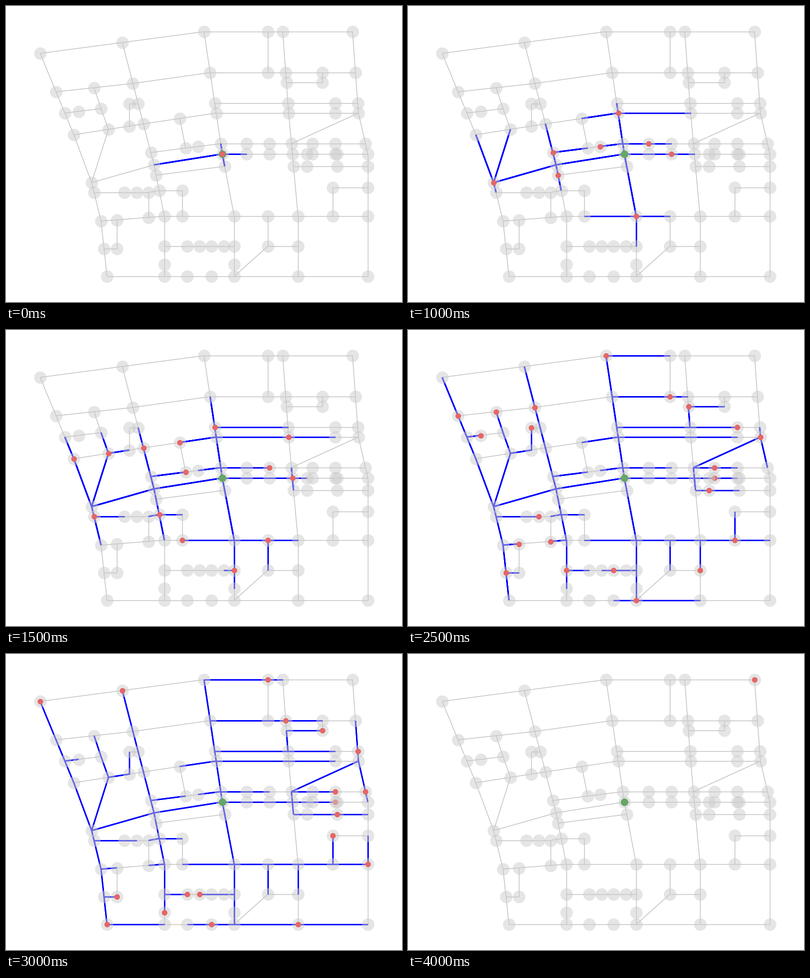
Write a matplotlib script that moves like this. It is 800x600 px and loops after 4500 ms.

```python
"""Breadth-first search spreading over a small street network."""
import matplotlib.pyplot as plt
import numpy as np
from matplotlib.animation import FuncAnimation
from matplotlib.collections import LineCollection

W, H, DPI = 800, 600, 100
STEPS, STEP_MS = 9, 500

near = {}      # junction -> neighbours, in the order the search tries them
streets = []


def link(*pts):
    """Join the junctions one after the other."""
    for a, b in zip(pts, pts[1:]):
        near.setdefault(a, []).append(b)
        near.setdefault(b, []).append(a)
        streets.append((a, b))


def avenue(knees, *stops):
    """Junctions of a street running down through its knees, keyed by y."""
    xs, ys = zip(*knees)
    return {y: (round(float(np.interp(y, ys, xs)), 1), y)
            for y in sorted({*ys, *stops})}


def row(y, avenues, *xs):
    """Level street between avenues, with extra junctions at xs."""
    link(*sorted([a[y] for a in avenues] + [(x, y) for x in xs]))


def slant(a, b, *xs):
    """Straight street from a to b; gives its inner junctions."""
    inner = [(x, round(float(np.interp(x, (a[0], b[0]), (a[1], b[1]))), 1)) for x in xs]
    link(a, *inner, b)
    return inner


rows = (135, 197, 217, 279, 300, 325, 426)
west = avenue([(69, 96), (137, 261), (173, 358), (192, 436), (204, 548)],
              174, 217, 378, 492)
inner = avenue([(235, 74), (299, 322), (320, 426), (320, 548)],
               157, 198, 239, 297, 343, 374, 487, 524)
mid = avenue([(400, 52), (437, 300), (461, 426), (461, 548)], *rows, 487, 524)
outer = avenue([(559, 52), (571, 217), (590, 426), (590, 548)], *rows, 155, 487)
east = avenue([(700, 52), (712, 217), (731, 300), (731, 548)], *rows, 368)
right = (mid, outer, east)
ROOT = mid[300]

# The main street comes first, then the avenues: this order settles ties
link(west[358], inner[322], ROOT)
row(300, right, 486, 532, 608, 619, 665, 669)
for a in (west, inner, mid, outer, east):
    link(*a.values())

# Level streets
row(52, right, 529)
row(135, right, 529, 639)
row(197, right, 665)
row(217, right, 665)
row(279, right, 486, 532, 619, 665)
row(426, (inner, *right), 356, 529, 660)
row(548, (west, inner, *right), 366, 415)
row(487, (inner, mid), 366, 391, 415, 440)
row(325, (outer, east), 608, 669)
row(155, [outer], 639)
row(487, [outer], 529)
row(368, [east], 660)
row(198, [inner], 249)
row(374, [inner], 356)
row(378, [west], 239, 264, 288)
row(492, [west], 224)

# Slanting streets
link(west[96], inner[74], mid[52])
link(inner[157], mid[135])
link(inner[343], mid[325])
link(outer[279], east[217])
link((529, 487), mid[548])
link((288, 378), inner[374])
hill, = slant(west[174], inner[157], 178)
bend, yard = slant(west[261], inner[239], 207, 249)
gate, = slant(inner[239], mid[217], 351)
dip, _ = slant(inner[297], mid[279], 363, 388)
low, shed = slant(west[436], inner[426], 224, 288)
fork = (192, 208)
slant(west[217], fork, 147)
link(hill, fork, bend, west[358])

# Short connections
link(gate, dip)
link(yard, (249, 198))
link(low, (224, 492))
link(shed, (288, 378))
for x, y0, y1 in ((529, 52, 135), (639, 135, 155), (660, 368, 426),
                  (529, 426, 487), (356, 374, 426)):
    link((x, y0), (x, y1))

# Breadth-first search: level of each junction and the streets walked
depth, walk, queue = {ROOT: 0}, [], [ROOT]
for a in queue:
    for b in near[a]:
        if b not in depth:
            depth[b] = depth[a] + 1
            walk.append((a, b))
            queue.append(b)

fig = plt.figure(figsize=(W / DPI, H / DPI), dpi=DPI, facecolor="white")
ax = fig.add_axes([0, 0, 1, 1])
ax.set_xlim(0, W)
ax.set_ylim(H, 0)
ax.axis("off")

ax.add_collection(LineCollection(streets, colors="#bebebe", linewidths=1, zorder=1),
                  autolim=False)
walked = LineCollection([], colors="blue", linewidths=2, zorder=2)
ax.add_collection(walked, autolim=False)
ax.scatter(*ROOT, s=100, c="green", zorder=3)
front = ax.scatter([], [], s=50, c="red", zorder=4)
ax.scatter(*zip(*depth), s=330, c="#cccccc", alpha=0.5, linewidths=0, zorder=5)


def draw(step):
    front.set_offsets(np.array([p for p, d in depth.items() if d == step]))
    seen = [e for e in walk if depth[e[1]] <= step + 1]
    # repeated strokes make slanting lines heavier; the last step has none
    walked.set_segments(seen * min(4, STEPS - 1 - step))
    return walked, front


anim = FuncAnimation(fig, draw, frames=STEPS, interval=STEP_MS,
                     repeat=True, repeat_delay=0, blit=False)
plt.show()
```
